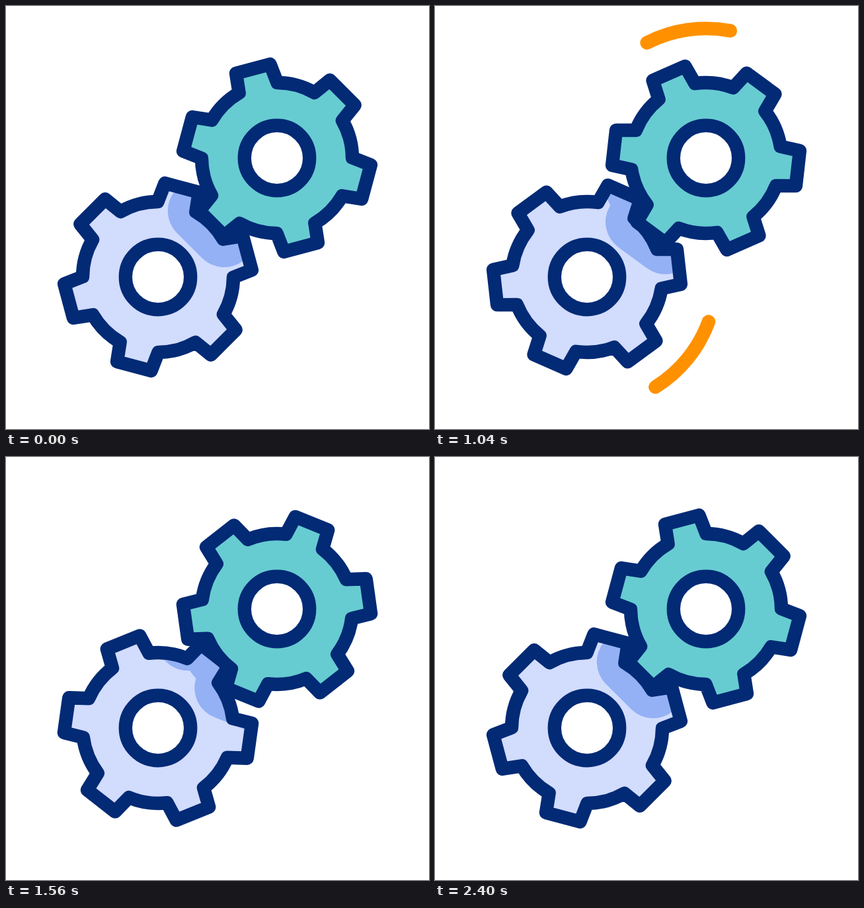
These frames come from a looping animation (640 by 640 pixels, 2.52 s). An HTML page:

```html
<!DOCTYPE html>
<html lang="en">
<head>
<meta charset="utf-8">
<title>Turning gears</title>
<style>
  html, body { margin: 0; width: 100%; height: 100%; overflow: hidden; background: #fff; }
  svg { display: block; width: 100%; height: 100%; }
  .line { fill: none; stroke: #022a75; stroke-width: 20.4; stroke-linejoin: round; }
  .hub { fill: #fff; }
  .teal { fill: #67ccd1; }
  .pale { fill: #d2dcfd; }
  .shade { fill: #93b1f4; stroke: #93b1f4; stroke-width: 95; stroke-linejoin: round; }
  .trail { fill: none; stroke: #ff9100; stroke-width: 20.6; stroke-linecap: round; }
</style>
</head>
<body>
<svg viewBox="0 0 640 640">
  <defs>
    <path id="gear"/>
    <clipPath id="inside"><path class="low shape"/></clipPath>
  </defs>
  <path class="low shape pale"/>
  <g clip-path="url(#inside)"><path class="high shape shade"/></g>
  <path class="low shape line"/>
  <circle class="line hub" cx="230" cy="410" r="49.2" style="fill:#fff"/>
  <path class="high shape teal"/>
  <path class="high shape line"/>
  <circle class="line hub" cx="410" cy="230" r="49.2" style="fill:#fff"/>
  <path class="trail" id="highTrail"/>
  <path class="trail" id="lowTrail"/>
</svg>
<script>
const LOOP = 2520, STEP = 40;
const HIGH = [410, 230], LOW = [230, 410];
const TRAIL_RADIUS = 196, TRAIL_FROM = 20, TRAIL_TO = -74.3;

// time in ms, turn of the upper gear in degrees
const TURN = [
  [240, 0], [720, 5], [1040, -68.6], [1200, -152],
  [1400, -262.2], [1720, -357.6], [1860, -365], [2420, -360]
];
const RESTS = [240, 720, 1860, 2420];

const all = selector => [...document.querySelectorAll(selector)];
const byId = id => document.getElementById(id);

// Point at an angle measured clockwise from straight up
function polar([cx, cy], radius, degrees) {
  const a = degrees * Math.PI / 180;
  return [cx + radius * Math.sin(a), cy - radius * Math.cos(a)];
}
const text = point => point.map(n => n.toFixed(3)).join(' ');

function gearPath() {
  const body = 114, baseHalf = 15.2;
  const tip = Math.hypot(139.8, 26.7);
  const tipHalf = Math.atan2(26.7, 139.8) * 180 / Math.PI;
  const at = (radius, degrees) => text(polar([0, 0], radius, degrees));
  let d = '';
  for (let a = 0; a < 360; a += 60) {
    d += a ? `A${body} ${body} 0 0 1 ` : 'M';
    d += `${at(body, a - baseHalf)}L${at(tip, a - tipHalf)}L${at(tip, a + tipHalf)}L${at(body, a + baseHalf)}`;
  }
  return d + `A${body} ${body} 0 0 1 ${at(body, -baseHalf)}Z`;
}

const pace = i => (TURN[i + 1][1] - TURN[i][1]) / (TURN[i + 1][0] - TURN[i][0]);

function slope(i) {
  if (RESTS.includes(TURN[i][0])) return 0;
  const before = TURN[i][0] - TURN[i - 1][0];
  const after = TURN[i + 1][0] - TURN[i][0];
  return (after * pace(i - 1) + before * pace(i)) / (before + after);
}

// Smooth curve through the turn keys
function turnAt(t) {
  const last = TURN.length - 1;
  if (t <= TURN[0][0]) return TURN[0][1];
  if (t >= TURN[last][0]) return TURN[last][1];
  const i = TURN.findIndex(key => key[0] > t) - 1;
  const [t0, v0] = TURN[i], [t1, v1] = TURN[i + 1];
  const h = t1 - t0, u = (t - t0) / h, w = 1 - u;
  return v0 * w * w * (1 + 2 * u) + v1 * u * u * (3 - 2 * u)
    + h * u * w * (w * slope(i) - u * slope(i + 1));
}

// Symmetric bezier ease with handles at (k, 0) and (1 - k, 1)
function ease(x, k) {
  if (x <= 0) return 0;
  if (x >= 1) return 1;
  let lo = 0, hi = 1;
  for (let n = 0; n < 30; n++) {
    const s = (lo + hi) / 2, r = 1 - s;
    if (3 * k * s * r * r + 3 * (1 - k) * s * s * r + s * s * s < x) lo = s;
    else hi = s;
  }
  return lo * lo * (3 - 2 * lo);
}

const sweep = (t, start, end) =>
  TRAIL_FROM + (TRAIL_TO - TRAIL_FROM) * ease((t - start) / (end - start), 0.58);

function arc(center, from, to) {
  const r = TRAIL_RADIUS;
  return `M${text(polar(center, r, from))}A${r} ${r} 0 0 ${to > from ? 1 : 0} ${text(polar(center, r, to))}`;
}

const place = ([x, y], degrees) => `translate(${x} ${y}) rotate(${degrees})`;

const shape = gearPath();
all('.shape').forEach(el => el.setAttribute('d', shape));
const highParts = all('.high'), lowParts = all('.low');
const highTrail = byId('highTrail'), lowTrail = byId('lowTrail');

function draw(t) {
  const turn = turnAt(t);
  highParts.forEach(el => el.setAttribute('transform', place(HIGH, turn - 15)));
  lowParts.forEach(el => el.setAttribute('transform', place(LOW, 15 - turn)));

  const visible = t >= 800 && t < 1440;
  const tail = sweep(t, 910, 1403);
  const head = Math.min(sweep(t, 760, 1320), tail - 0.05);
  highTrail.setAttribute('d', visible ? arc(HIGH, tail, head) : '');
  lowTrail.setAttribute('d', visible ? arc(LOW, 121 - tail, 121 - head) : '');
}

const begin = performance.now();
function tick() {
  const t = (performance.now() - begin) % LOOP;
  draw(Math.floor(t / STEP) * STEP);
  requestAnimationFrame(tick);
}
tick();
</script>
</body>
</html>
```
